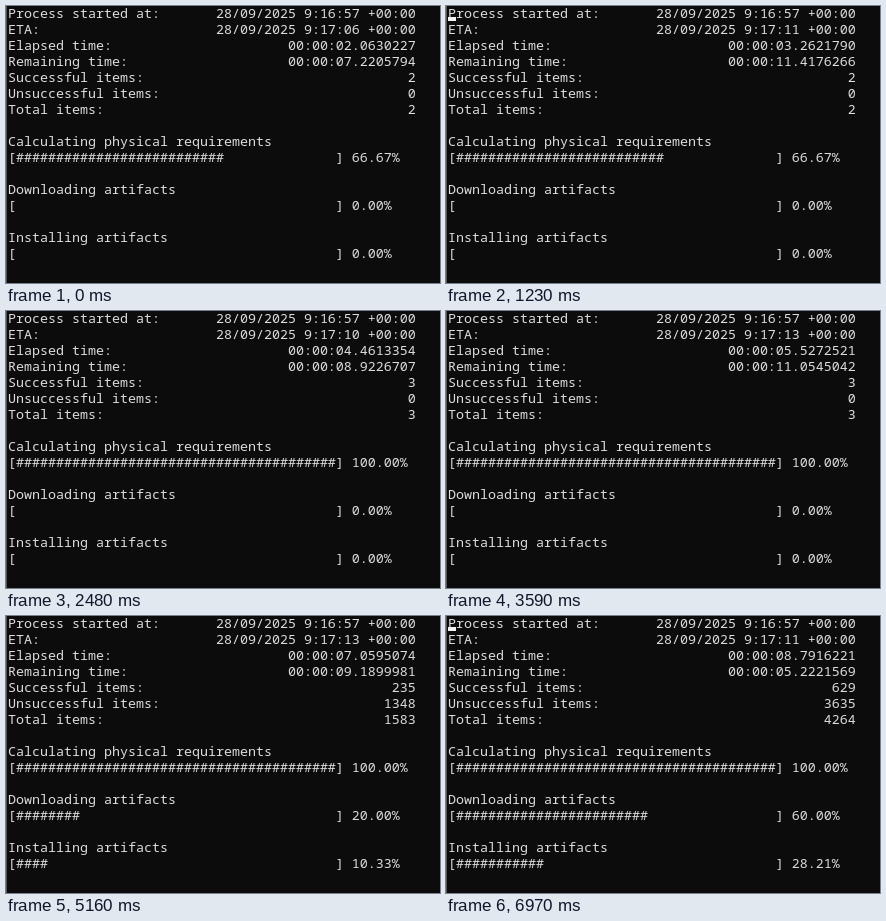
Recreate the animation shown at these times as an HTML page. Size 434 by 277 pixels, loop 7.04 s.

```html
<!DOCTYPE html>
<html lang="en">
<head>
<meta charset="utf-8">
<title>Console progress</title>
<style>
html, body { margin: 0; width: 100%; height: 100%; overflow: hidden; background: #0c0c0c; }
body { position: relative; }
pre {
  position: absolute; left: 2px; top: -1px; margin: 0; color: #ddd;
  font: calc(40px / 3)/16px "Noto Sans Mono", "DejaVu Sans Mono", monospace;
  font-variant-ligatures: none;
}
#edge { position: absolute; left: 0; top: 0; width: 1px; height: 100%; background: #555; }
#cursor { position: absolute; left: 2px; top: 11px; width: 8px; height: 4px; background: #f2f2f2; }
</style>
</head>
<body>
<div id="edge"></div>
<pre id="output"></pre>
<div id="cursor"></div>
<script>
const LOOP = 7040, REPAINTS = 102, STEP = LOOP / REPAINTS;
const START = 57.2;            // seconds past 9:16
const CALCULATED_AT = 1910;    // ms, third calculation finishes
const INSTALL_AT = 4139;       // ms, first download finishes
const INSTALL_RATE = 1.494;    // items per ms
const DOWNLOAD_MS = 1250, PACKAGES = 15000, FAIL_RATE = 0.853;
const BLINK = 505;

const output = document.getElementById('output');
const cursor = document.getElementById('cursor');

const two = n => String(n).padStart(2, '0');
const row = (label, value) => label + String(value).padStart(51 - label.length);
const span = s => '00:00:' + s.toFixed(7).padStart(10, '0');
const bar = p => `[${'#'.repeat(p * 40 + 1e-9).padEnd(40)}] ${(p * 100).toFixed(2)}%`;
const date = s => `28/09/2025 9:${16 + Math.floor(s / 60)}:${two(Math.floor(s % 60))} +00:00`;
const itemsAt = t => Math.max(0, Math.round((t - INSTALL_AT) * INSTALL_RATE));

function draw(t) {
  const calculated = t < CALCULATED_AT ? 2 : 3;
  const downloaded = Math.max(0, 1 + Math.floor((t - INSTALL_AT) / DOWNLOAD_MS));
  const parts = [calculated / 3, downloaded / 5, itemsAt(t) / PACKAGES];
  const done = (parts[0] + parts[1] + parts[2]) / 3;

  const elapsed = 2.0630227 + t * 0.00096523;
  const remaining = elapsed * (1 - done) / done;

  // Items are counted slightly before the install bar reflects them
  const handled = itemsAt(t + 20);
  const failed = Math.round(handled * FAIL_RATE);

  output.textContent = [
    row('Process started at:', date(START)),
    row('ETA:', date(START + elapsed + remaining)),
    row('Elapsed time:', span(elapsed)),
    row('Remaining time:', span(remaining)),
    row('Successful items:', calculated + handled - failed),
    row('Unsuccessful items:', failed),
    row('Total items:', calculated + handled),
    '',
    'Calculating physical requirements', bar(parts[0]), '',
    'Downloading artifacts', bar(parts[1]), '',
    'Installing artifacts', bar(parts[2])
  ].join('\n');

  const phase = t % BLINK;
  cursor.hidden = phase < 140 || phase >= 435;
}

const begin = performance.now();
function tick() {
  const ms = (performance.now() - begin) % LOOP;
  // The console repaints in even steps, a little ahead of the clock
  draw(Math.min(REPAINTS - 1, Math.floor((ms + 20) / STEP)) * STEP);
  requestAnimationFrame(tick);
}
tick();
</script>
</body>
</html>
```
